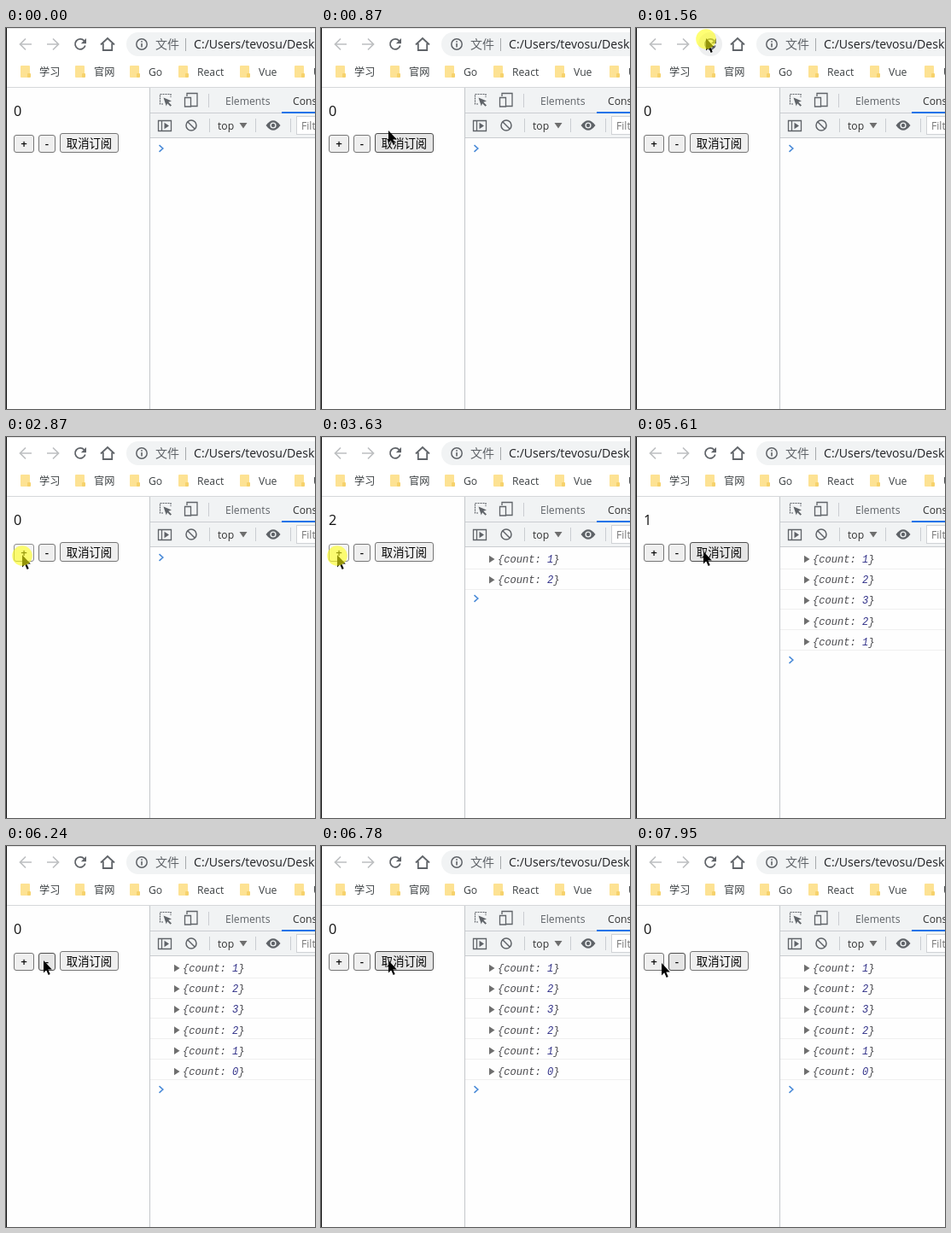
Recreate the animation shown at these times as an HTML page. Size 362 px wide and 446 px high, loop 8 s.

```html
<!DOCTYPE html>
<html lang="zh">
<head>
<meta charset="utf-8">
<style>
html, body { margin: 0; width: 100%; height: 100%; overflow: hidden; background: #fefefe; }
svg { display: block; width: 100%; height: 100%; }
text { font-family: "Open Sans", "Noto Sans CJK SC", "Noto Sans CJK", sans-serif; white-space: pre; }
.line { fill: none; stroke: #5f6368; stroke-width: 1.5; }
.mono { font: italic 12.1px "Liberation Mono", monospace; }
</style>
</head>
<body>
<svg id="stage" viewBox="0 0 362 446"></svg>
<script>
const stage = document.getElementById('stage');

function add(tag, attrs, content = '', parent = stage) {
  const el = document.createElementNS('http://www.w3.org/2000/svg', tag);
  set(el, attrs);
  el.textContent = content;
  return parent.appendChild(el);
}
function set(el, attrs) {
  for (const name in attrs) el.setAttribute(name, attrs[name]);
}
const rect = (x, y, width, height, fill, more) => add('rect', { x, y, width, height, fill, ...more });
const label = (x, y, str, size, fill, more) => add('text', { x, y, 'font-size': size, fill, ...more }, str);
const path = (d, style = '') => add('path', { d, class: 'line', style });
const shape = (d, fill, parent) => add('path', { d, fill }, '', parent);
const circle = (cx, cy, r, more) => add('circle', { cx, cy, r, ...more });
const show = (el, on) => el.setAttribute('visibility', on ? 'visible' : 'hidden');

// Browser toolbar
rect(0, 0, 362, 69, '#fff');
rect(0, 0, 362, 1, '#e4e4e4');
const reloadHover = circle(87, 19, 14, { fill: '#eeeff0' });
for (const [x, dir] of [[23, 1], [55, -1]])
  path('M7 0H-6M0-6.5L-6.5 0 0 6.5', 'stroke:#bdbfc1;stroke-width:1.7')
    .setAttribute('transform', `translate(${x} 19) scale(${dir} 1)`);
path('M91.6 15A6 6 0 1 0 92.8 20.5', 'stroke-width:1.8');
shape('M94 12V18.2H87.8Z', '#5f6368');
path('M111 19.5L119 12 127 19.5M113.8 18V26H124.2V18', 'stroke-width:1.8');
rect(141, 5, 260, 28, '#f1f3f4', { rx: 14 });
circle(159, 19, 6.2, { class: 'line' });
rect(158.2, 18, 1.6, 4.5, '#5f6368');
rect(158.2, 15.2, 1.6, 1.6, '#5f6368');
label(175, 24, '文件', 14, '#5f6368');
rect(210, 12, 1, 15, '#a5a8ab');
label(220, 24, 'C:/Users/tevosu/Desktop', 14.1, '#202124');

// Bookmarks
[[17, '学习'], [81, '官网'], [145, 'Go'], [202, 'React'], [274, 'Vue'], [338, 'UI']].forEach(([x, name]) => {
  rect(x, 44, 11, 14, '#fde293', { rx: 1 });
  rect(x + 8, 53, 4, 5, '#f6d26c', { rx: 1 });
  label(x + 22, 56, name, 12.2, '#3c4043');
});
rect(0, 69, 362, 1, '#d5d7da');

// Developer tools
rect(168, 70, 194, 58, '#f1f3f4');
rect(168, 99, 194, 1, '#cacdd1');
rect(168, 128, 194, 1, '#cacdd1');
rect(168, 70, 1, 376, '#c4c7cb');
path('M184 89H180.5V77.5H193V81', 'stroke-width:1.2;stroke-dasharray:2 1');
shape('M184.5 81.5L194 85.4 190.3 86.8 194 90.4 192.6 91.8 189 88.2 187.8 91.4Z', '#5f6368');
path('M212 80V76.5H224V91.5H217M209.5 81.5H216.5V92H209.5Z', 'stroke-width:1.3');
rect(237, 77, 1, 16, '#cacdd1');
label(257, 89.5, 'Elements', 12.2, '#5f6368');
label(336, 89.5, 'Console', 12.2, '#333');
rect(323, 98, 39, 2, '#1a73e8');

path('M178.5 108.5H193.5V120.5H178.5ZM182.5 108.5V120.5', 'stroke-width:1.3');
shape('M185.5 110.8V118.2L191 114.5Z', '#5f6368');
circle(217, 114, 6, { class: 'line' });
path('M213 110L221 118');
for (const x of [238, 292, 333]) rect(x, 106, 1, 16, '#cacdd1');
label(248, 118.5, 'top', 12.2, '#333');
shape('M273.5 111H282.5L278 117.5Z', '#6e6e6e');
shape('M304.5 114Q313 102.5 321.5 114 313 125.5 304.5 114Z', '#5f6368');
circle(313, 114, 3.6, { fill: '#f1f3f4' });
circle(313, 114, 2.2, { fill: '#5f6368' });
rect(340.5, 103.5, 40, 21, '#fff', { stroke: '#d0d3d6' });
label(346, 119, 'Filter', 12.2, '#757575');

// Each press shows a glow; the count follows shortly after.
const PRESS_GAP = 345, GLOW_TIME = 150, COUNT_DELAY = 130;
const burst = (at, times, change) =>
  Array.from({ length: times }, (_, i) => ({ at: at + PRESS_GAP * i, change }));
const presses = [
  ...burst(1490, 1, 0), ...burst(2870, 3, 1), ...burst(4920, 2, -1),
  ...burst(6090, 1, -1), ...burst(6630, 1, 0)
];
let count = 0;
const logs = presses.filter(press => press.change)
  .map(({ at, change }) => ({ at: at + COUNT_DELAY, value: count += change }));

// Console output
logs.forEach((log, i) => {
  const y = 143 + 24.2 * i;
  const row = log.row = add('g', {});
  shape(`M197 ${y - 4.3}v8.6l6.5-4.3Z`, '#6e6e6e', row);
  const text = add('text', { x: 207, y: y + 4, class: 'mono', fill: '#4a4a4e' }, '{count: ', row);
  add('tspan', { fill: '#33338a' }, log.value, text);
  add('tspan', {}, '}', text);
  add('rect', { x: 169, y: Math.round(153.6 + 23.9 * i), width: 193, height: 1, fill: '#efefef' }, '', row);
});
const prompt = path('M179.5-3.8L183.8 0 179.5 3.8', 'stroke:#4a8bd8;stroke-width:1.6');

// Page
const counter = label(9, 103, '0', 16.3, '#111');
const buttons = [
  [9, 125, 24, 21, '+', 600],
  [38, 125, 20, 21, '-', 600],
  [63, 123, 69, 23, '取消订阅', 400]
].map(([x, y, w, h, name, weight]) => {
  const box = rect(x + .5, y + .5, w - 1, h - 1, '#efefef', { rx: 2.5, stroke: '#767676' });
  label(x + w / 2, 140, name, 13.33, '#000', { 'text-anchor': 'middle', 'font-weight': weight });
  return { box, holds: p => p.x >= x && p.x < x + w && p.y >= y && p.y < y + h };
});
rect(0, 0, 1, 446, '#111');

const arrow = shape('M0 0V14.4L3.2 11.3 5.7 17 7.7 16.1 5.3 10.5H9.8Z', '#000');
const resizer = shape('M160 263.5L164 260V262.5H175V260L179 263.5 175 267V264.5H164V267Z', '#000');
const glow = circle(0, 0, 11.8, { fill: '#ffff10', opacity: .58 });

// Pointer route between named spots
const SPOTS = {
  entry: [232, 309], divider: [168, 263], reload: [82, 12], plusEdge: [15, 131],
  plus: [19, 138], minus: [44, 134], unsubscribe: [79, 134], exit: [29, 137]
};
const MOVES = [
  [180, 250, 'divider'], [400, 800, 'unsubscribe'], [800, 1420, 'reload'],
  [1640, 2060, 'plusEdge'], [2470, 2670, 'plus'], [3700, 4050, 'minus'],
  [5390, 5610, 'unsubscribe'], [5680, 6020, 'minus'], [6310, 6450, 'unsubscribe'],
  [7110, 7320, 'plus'], [7450, 7660, 'unsubscribe'], [7810, 7950, 'exit']
];
const LOOP = 8000, STEP = 68.7, START = 180;

function pointerAt(t) {
  let [x, y] = SPOTS.entry;
  for (const [from, to, spot] of MOVES) {
    const k = Math.min(1, Math.max(0, (t - from) / (to - from)));
    x += (SPOTS[spot][0] - x) * k;
    y += (SPOTS[spot][1] - y) * k;
  }
  return { x: Math.round(x), y: Math.round(y) };
}

function draw(t) {
  // The pointer is sampled at a fixed rate, and hover styles lag one sample behind.
  const sampled = START + Math.floor((t - START + 8) / STEP) * STEP + 4;
  const p = pointerAt(sampled);
  const hovered = pointerAt(sampled - STEP);
  const visible = t >= START;
  const resizing = p.y > 70 && Math.abs(p.x - 168) < 5;
  const pressed = presses.some(({ at }) => t >= at && t < at + GLOW_TIME);

  const shown = logs.filter(log => t >= log.at);
  logs.forEach(log => show(log.row, t >= log.at));
  prompt.setAttribute('transform', `translate(0 ${141 + 24 * shown.length})`);
  counter.textContent = shown.length ? shown.at(-1).value : 0;

  for (const { box, holds } of buttons) {
    const hover = visible && holds(hovered);
    set(box, {
      fill: !hover ? '#efefef' : pressed ? '#f5f5f5' : '#e5e5e5',
      stroke: !hover ? '#767676' : pressed ? '#8d8d8d' : '#4f4f4f'
    });
  }
  show(reloadHover, Math.hypot(hovered.x - 87, hovered.y - 19) < 14);

  set(glow, { cx: p.x, cy: p.y + 1 });
  show(glow, pressed);
  set(arrow, { transform: `translate(${p.x} ${p.y})` });
  show(arrow, visible && !resizing);
  show(resizer, visible && resizing);
}

const begin = performance.now();
function tick() {
  draw((performance.now() - begin) % LOOP);
  requestAnimationFrame(tick);
}
tick();
</script>
</body>
</html>
```
